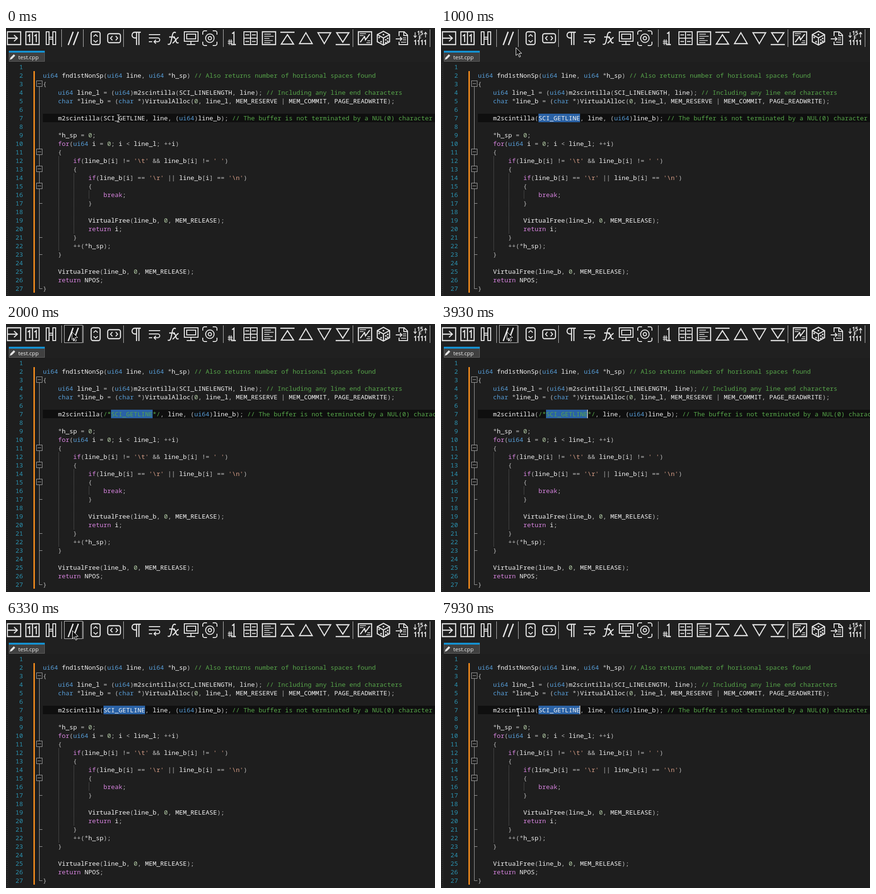
Write an HTML page that moves like this. It is 907 by 566 pixels and loops after 8 s.

```html
<!DOCTYPE html>
<html lang="en">
<head>
<meta charset="utf-8">
<title>Toggle comment</title>
<style>
  html, body { margin: 0; width: 100%; height: 100%; overflow: hidden; background: #1e1e1e; }
  svg { display: block; width: 907px; height: 566px; }
  text { white-space: pre; }
  .code { font: 500 13.333px "Noto Sans Mono", "DejaVu Sans Mono", monospace; }
  .num { fill: #2b91af; }
  .icons { fill: none; stroke: #e4e4e4; stroke-width: 2.3; }
  .icons .mid { stroke-width: 2; }
  .icons .thin { stroke-width: 1.5; }
  .icons .solid { fill: #e4e4e4; stroke: none; }
  .icons text { fill: #e4e4e4; stroke: none; font: 700 11.5px "Open Sans", sans-serif; }
</style>
</head>
<body>
<svg viewBox="0 0 907 566">
  <rect width="907" height="566" fill="#1e1e1e"/>
  <rect width="907" height="72" fill="#202020"/>
  <path d="M2.5 74V566" stroke="#555" stroke-dasharray="1 3"/>
  <path d="M5.5 72V566" stroke="#262626"/>

  <g id="tab">
    <rect x="6.5" y="48.5" width="75" height="22" fill="#404040" stroke="#626262"/>
    <rect x="6" y="48" width="76" height="4" fill="#1591d1"/>
    <path d="M8 67l1.500-4.500 7-7 3 3-7 7z" fill="#e4e4e4"/>
    <text x="26" y="66" font-size="11.6" fill="#f4f4f4" font-family="Open Sans, sans-serif">test.cpp</text>
  </g>

  <rect id="button" x="123.5" y="2.5" width="38" height="37" fill="#191919" stroke="#d0d0d0" visibility="hidden"/>
  <path d="M117.5 3V40M163.5 3V40M248.5 3V40M459.5 3V40M733.5 3V40M896.5 3V40" stroke="#c4c4c4"/>

  <g class="icons">
    <path d="M3 8H31V35H3ZM3 21.5H23M17 15l7 6.5-7 6.5"/>
    <path d="M42 8H70V35H42ZM56 8V35M46 17l4-3V30M60 17l4-3V30"/>
    <path class="mid" d="M85 8h6v27h-6zM99 8h6v27h-6zM91 19.5h8M91 23.5h8"/>
    <path id="slashes" d="M131.5 36L142 8M142.5 36L153 8" stroke-width="2.8"/>
    <rect x="180" y="8" width="19" height="27" rx="4"/>
    <path class="mid" d="M185 18l4.5-4 4.5 4M185 26l4.5 4 4.5-4"/>
    <rect x="215" y="12" width="27" height="19" rx="4"/>
    <path class="mid" d="M225 17l-4 4.500 4 4.500M232 17l4 4.500-4 4.500"/>
    <path d="M285 9H272a5.5 6 0 0 0 0 12h4M276 9V36M281 9V36"/>
    <path class="mid" d="M302 14H326M302 21H321a4 4 0 0 1 0 8H313M317 25l-4 4 4 4M302 29h7"/>
    <path d="M342 34c4 2 6-1 7-6l3-14c1-5 4-6 7-4M345 19h12M354 21c3-1 4 1 5 5s2 7 6 5M365 20c-4 0-8 10-13 12"/>
    <path class="mid" d="M377 8H406V28H377ZM382 13H401V23H382ZM391 28v6M382 35H400"/>
    <path class="mid" d="M416 14V10a4 4 0 0 1 4-4h5M437 6h5a4 4 0 0 1 4 4v4M446 29v4a4 4 0 0 1-4 4h-5M425 37h-5a4 4 0 0 1-4-4v-4"/>
    <circle class="mid" cx="431" cy="21.5" r="9"/><circle class="mid" cx="431" cy="21.5" r="3.5"/>
    <path d="M478 12l4-3V35M477 35h9"/>
    <path class="thin" d="M472 24v12M476 24v12M469 28h10M469 32h10"/>
    <path class="mid" d="M503 8H531V35H503ZM517 8V35M503 21.5H531M506 14.5h8M520 14.5h8M506 28.5h8M520 28.5h8"/>
    <path d="M542 8H570V35H542Z"/>
    <path d="M546 13h14M546 17.5h20M546 22h11M546 26.5h18M546 31h13" stroke-width="1.7"/>
    <path d="M580 9H610M595 14L608 34H582Z"/>
    <path d="M634 10L647.5 33H620.5Z"/>
    <path d="M673 33L686.5 10H659.5Z"/>
    <path d="M697 35H727M712 30L725 10H699Z"/>
    <path d="M745 8H773V35H745Z"/>
    <path d="M749 30L758 18 760 25 769 13"/>
    <path class="thin" d="M748 12h13M748 16h8M762 31h8M764 27h6"/>
    <path d="M798 7L811 14V29L798 36 785 29V14ZM785 14L798 21 811 14M798 21V36"/>
    <g id="pips" class="solid"></g>
    <path class="mid" d="M831 17V8H842L849 15V35H831V29M841 8v8h8M824 23h13M833 19l4 4-4 4"/>
    <path class="thin" d="M839 21h7M839 25h7M835 30h11"/>
    <path class="thin" d="M865 9V19M862 16l3 4 3-4M887 20V10M884 13l3-4 3 4"/>
    <text x="869" y="14.5">15</text>
    <text x="872" y="25">F</text>
    <path class="mid" d="M863 28l3-2v10M870 28l3-2v10M877 28l3-2v10M884 28l3-2v10"/>
  </g>

  <rect x="78" y="181" width="829" height="18" fill="#0f0f0f"/>
  <rect id="selection" y="181" width="88" height="18" fill="#2a62a6"/>
  <rect x="58" y="91" width="3" height="468" fill="#f28a1c"/>
  <g id="folds" fill="#1e1e1e" stroke="#a5a5a5">
    <path d="M70.5 124V550.5H77M70.5 370.5H77M70.5 442.5H77M70.5 478.5H77"/>
  </g>
  <path d="M111.5 271V470M143.5 307V434M175.5 343V361" stroke="#747474" stroke-dasharray="1 1"/>
  <g id="code" class="code"></g>
  <rect id="caret" y="181" width="1.3" height="18" fill="#f4f4f4"/>
  <path id="arrow" d="M.5 .5V17L4.5 13.5 7.5 20.5 10.2 19.3 7.2 12.5H12.5Z" fill="#101010" stroke="#fff"/>
  <path id="beam" d="M-3-7.5H3M0-7.5V7.5M-3 7.5H3" fill="none" stroke="#e4e4e4"/>
</svg>

<script>
const LOOP = 8000, LEFT = 78, CHAR = 8, ROW = 18;
const el = id => document.getElementById(id);
const add = (parent, name, attrs, content) => {
  const node = document.createElementNS('http://www.w3.org/2000/svg', name);
  for (const key in attrs) node.setAttribute(key, attrs[key]);
  if (content !== undefined) node.textContent = content;
  return parent.appendChild(node);
};
const show = (node, on) => node.setAttribute('visibility', on ? 'visible' : 'hidden');

const source = String.raw`
ui64 fnd1stNonSp(ui64 line, ui64 *h_sp) // Also returns number of horisonal spaces found
{
    ui64 line_l = (ui64)m2scintilla(SCI_LINELENGTH, line); // Including any line end characters
    char *line_b = (char *)VirtualAlloc(0, line_l, MEM_RESERVE | MEM_COMMIT, PAGE_READWRITE);

    m2scintilla(SCI_GETLINE, line, (ui64)line_b); // The buffer is not terminated by a NUL(0) character

    *h_sp = 0;
    for(ui64 i = 0; i < line_l; ++i)
    {
        if(line_b[i] != '\t' && line_b[i] != ' ')
        {
            if(line_b[i] == '\r' || line_b[i] == '\n')
            {
                break;
            }

            VirtualFree(line_b, 0, MEM_RELEASE);
            return i;
        }
        ++(*h_sp);
    }

    VirtualFree(line_b, 0, MEM_RELEASE);
    return NPOS;
}`.split('\n');

const syntax = [
  [/^(\/\/.*|\/\*.*?\*\/)/, '#57a64a'],
  [/^'[^']*'/, '#d69d85'],
  [/^(ui64|char)\b/, '#569cd6'],
  [/^(for|if|return|break)\b/, '#d884e0'],
  [/^\d+/, '#b5cea8'],
  [/^\w+/, '#f4f4f4'],
  [/^[^\w\s'\/]+/, '#b8b8b8'],
  [/^\s+/, null],
];

function renderLine(node, line) {
  node.textContent = '';
  for (let col = 0; col < line.length;) {
    const rest = line.slice(col);
    const [pattern, fill] = syntax.find(([p]) => p.test(rest));
    const token = rest.match(pattern)[0];
    if (fill) add(node, 'tspan', { x: LEFT + col * CHAR, fill }, token);
    col += token.length;
  }
}

const rows = source.map((line, i) => {
  const y = 87 + i * ROW;
  const label = String(i + 1);
  add(el('code'), 'text', { x: 36 - label.length * CHAR, y, class: 'num' }, label);
  const row = add(el('code'), 'text', { y });
  renderLine(row, line);
  return row;
});

for (const n of [3, 11, 13, 15]) {
  const y = 63.5 + n * ROW;
  add(el('folds'), 'rect', { x: 64.5, y: y - 6, width: 12, height: 12 });
  add(el('folds'), 'path', { d: `M67 ${y}H74` });
}

for (const [x, y] of [[798, 14], [789, 20], [793, 29], [803, 25], [807, 22], [803, 31], [807, 28]])
  add(el('pips'), 'circle', { cx: x, cy: y, r: 1.8 });

const SELECT_AT = 200, COMMENT_AT = 1800, UNCOMMENT_AT = 4470;
const target = 'SCI_GETLINE', edited = 6;
const plain = source[edited], commented = plain.replace(target, `/*${target}*/`);
const caretOn = [[200, 700], [1470, 1930], [2470, 2930], [3470, 4930], [5470, 5930], [6430, 6930], [7430, LOOP]];
const presses = [[1670, 1860], [4400, 4540]];
const within = (spans, t) => spans.some(([from, to]) => t >= from && t < to);

// Pointer stops: time, x, y
const stops = [
  [0, 237, 191], [670, 237, 191], [1000, 158, 41], [1200, 148, 26], [1400, 147, 25], [1600, 139, 16],
  [5260, 139, 16], [5330, 141, 18], [5470, 140, 22], [6380, 140, 22],
  [6720, 136, 120], [7000, 120, 192], [7200, 116, 195], [7670, 163, 195], [LOOP, 163, 195],
];

function pointerAt(t) {
  const i = Math.max(1, stops.findIndex(s => s[0] > t));
  const [t0, x0, y0] = stops[i - 1], [t1, x1, y1] = stops[i];
  const p = (t - t0) / (t1 - t0), e = p * p * (3 - 2 * p);
  return [x0 + (x1 - x0) * e, y0 + (y1 - y0) * e];
}

let shownLine = plain;
function draw(t) {
  const isCommented = t >= COMMENT_AT && t < UNCOMMENT_AT;
  const line = isCommented ? commented : plain;
  if (line !== shownLine) renderLine(rows[edited], shownLine = line);

  const start = LEFT + line.indexOf(target) * CHAR;
  el('selection').setAttribute('x', start);
  show(el('selection'), t >= SELECT_AT);
  el('caret').setAttribute('x', start + target.length * CHAR - 1);
  show(el('caret'), within(caretOn, t));

  const [x, y] = pointerAt(t).map(Math.round);
  const overText = y > 72;
  el('beam').setAttribute('transform', `translate(${x + .5} ${y})`);
  el('arrow').setAttribute('transform', `translate(${x} ${y})`);
  show(el('beam'), overText);
  show(el('arrow'), !overText);
  show(el('button'), x >= 123 && x <= 162 && y >= 2 && y <= 39);
  el('slashes').setAttribute('transform', within(presses, t) ? 'translate(1 1)' : '');
}

const began = performance.now();
function frame() {
  draw((performance.now() - began) % LOOP);
  requestAnimationFrame(frame);
}
frame();
</script>
</body>
</html>
```
